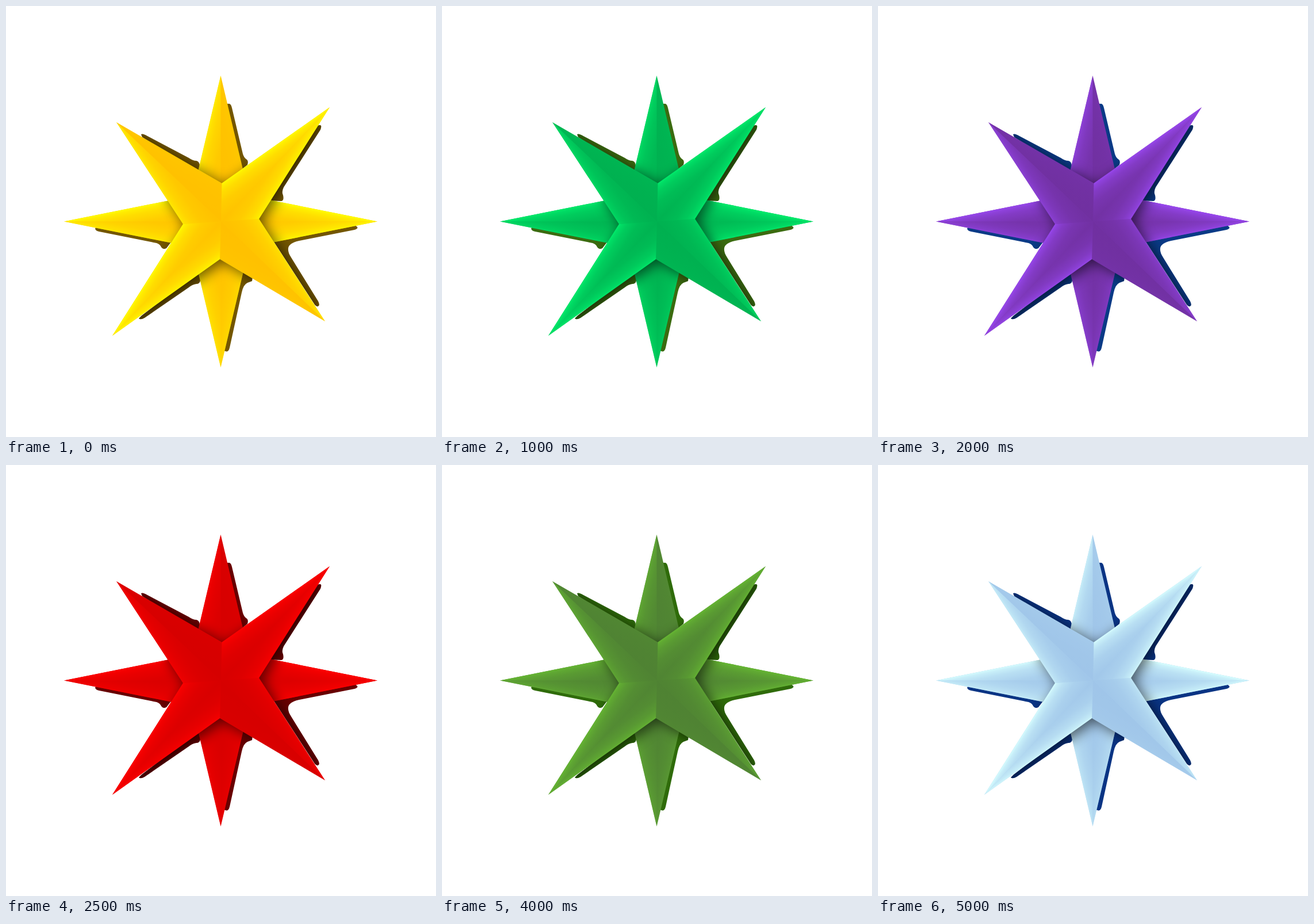
An HTML page that plays this animation: 748 by 749 pixels, repeating every 5.5 s.

```html
<!DOCTYPE html>
<html lang="en">
<head>
<meta charset="utf-8">
<title>Colour-changing star</title>
<style>
  html, body { margin: 0; width: 100%; height: 100%; overflow: hidden; background: #fff; }
  svg { display: block; width: 100%; height: 100%; }
  .base { fill: var(--base); }
  .cast { fill: var(--cast); }
  stop { stop-color: var(--light); }
</style>
</head>
<body>
<svg viewBox="0 0 748 749">
  <defs>
    <filter id="soft" x="-20%" y="-20%" width="140%" height="140%">
      <feGaussianBlur stdDeviation="11"/>
    </filter>
    <clipPath id="under"></clipPath>
  </defs>
  <g id="casts"></g>
  <g id="back"></g>
  <g clip-path="url(#under)"><g id="shade" filter="url(#soft)" opacity=".58"></g></g>
  <g id="front"></g>
</svg>
<script>
const STEP = 500;

// base, light edge, cast shadow
const THEMES = [
  ['#ffc000', '#ffff00', '#735600'],
  ['#8cc840', '#b4f860', '#566b08'],
  ['#00b050', '#00ee6c', '#3b6b10'],
  ['#0070c0', '#109cff', '#0c4078'],
  ['#7030a0', '#9a48f2', '#0a3a86'],
  ['#d60000', '#ff0000', '#680000'],
  ['#ffc400', '#ffff00', '#6c6c04'],
  ['#f8e800', '#ffff00', '#6c6c04'],
  ['#4f8233', '#66b832', '#2f6b0a'],
  ['#00b0f0', '#40e4ff', '#0a3a86'],
  ['#9fc5e9', '#d8ffff', '#0a3484']
];

// Tips clockwise; inner[i] sits just before tip i.
// glow[i] is the edge light on the sides before and after the ridge.
const BACK = {
  center: [373.5, 374.5],
  tips: [[373.5, 121], [646, 374.5], [373.5, 628], [101, 374.5]],
  inner: [[324, 330], [423, 330], [423, 419], [324, 419]],
  glow: [[.7, .12], [1, .85], [.4, .55], [.65, .95]]
};
const FRONT = {
  center: [374, 374.5],
  tips: [[563, 176], [555, 548], [185, 573], [192, 202]],
  inner: [[375.5, 308], [440, 370], [372, 440], [308, 379]],
  glow: [[.95, .85], [.55, .1], [.85, .95], [.65, .1]]
};

const CASTS = [
  'M380 168 L386 170 Q391 168 393 177 L412 257 Q414 264 419 267 Q422 269 420 276 L400 292 Z',
  'M535 209 L546 207 Q550 207 547 215 L483 315 Q479 323 482 329 Q484 338 479 339 L455 338 Z',
  'M606 380 L611 384 Q613 387 606 389 L510 408 Q492 412 491 421 Q490 428 496 437 L543 513 Q546 519 544 521 Q541 524 537 519 L440 370 Z',
  'M378 599 L382 600 Q387 602 389 594 L410 498 Q413 484 420 481 L428 478 L429 470 L405 455 Z',
  'M158 382 L155 387 Q156 391 162 392 L262 412 Q268 414 270 419 Q273 424 279 421 L295 400 Z',
  'M236 538 L231 543 Q234 546 241 542 L318 489 Q324 484 331 483 Q337 483 338 477 L345 455 Z',
  'M237 228 L235 223 Q238 221 246 226 L318 264 Q325 269 331 269 Q337 270 337 279 L335 290 Z'
];

const $ = id => document.getElementById(id);
function add(parent, tag, attrs) {
  const el = document.createElementNS('http://www.w3.org/2000/svg', tag);
  for (const key in attrs) el.setAttribute(key, attrs[key]);
  return parent.appendChild(el);
}

const outline = s => s.tips.flatMap((tip, i) => [s.inner[i], tip]).join(' ');

// A facet is lit from its outer edge inwards, at right angles to that edge.
function facet(group, id, center, inner, tip, glow) {
  const [dx, dy] = [tip[0] - inner[0], tip[1] - inner[1]];
  const len = Math.hypot(dx, dy);
  let [nx, ny] = [-dy / len, dx / len];
  if ((center[0] - inner[0]) * nx + (center[1] - inner[1]) * ny < 0) [nx, ny] = [-nx, -ny];
  const depth = 50;
  const grad = add(group, 'linearGradient', {
    id, gradientUnits: 'userSpaceOnUse',
    x1: inner[0], y1: inner[1],
    x2: inner[0] + nx * depth, y2: inner[1] + ny * depth
  });
  for (const [at, k] of [[0, 1], [.08, .75], [.25, .48], [.55, .22], [1, .06]])
    add(grad, 'stop', { offset: at, 'stop-opacity': k * glow });
  add(group, 'polygon', { points: [center, inner, tip].join(' '), fill: `url(#${id})` });
}

function drawStar(id, star) {
  const group = $(id);
  add(group, 'polygon', { class: 'base', points: outline(star) });
  star.tips.forEach((tip, i) => {
    const sides = [star.inner[i], star.inner[(i + 1) % 4]];
    sides.forEach((inner, j) =>
      facet(group, `${id}${i}${j}`, star.center, inner, tip, star.glow[i][j]));
  });
}

for (const d of CASTS) {
  add($('casts'), 'path', { class: 'cast', d });
  add($('under'), 'path', { d });
}
add($('under'), 'polygon', { points: outline(BACK) });
add($('shade'), 'polygon', { points: outline(FRONT), transform: 'translate(6 5)' });
drawStar('back', BACK);
drawStar('front', FRONT);

let shown = -1;
function paint(now) {
  const i = Math.floor(now / STEP) % THEMES.length;
  if (i !== shown) {
    shown = i;
    ['--base', '--light', '--cast'].forEach((name, k) =>
      document.documentElement.style.setProperty(name, THEMES[i][k]));
  }
}
function tick() {
  paint(performance.now());
  requestAnimationFrame(tick);
}
paint(0);
requestAnimationFrame(tick);
</script>
</body>
</html>
```
